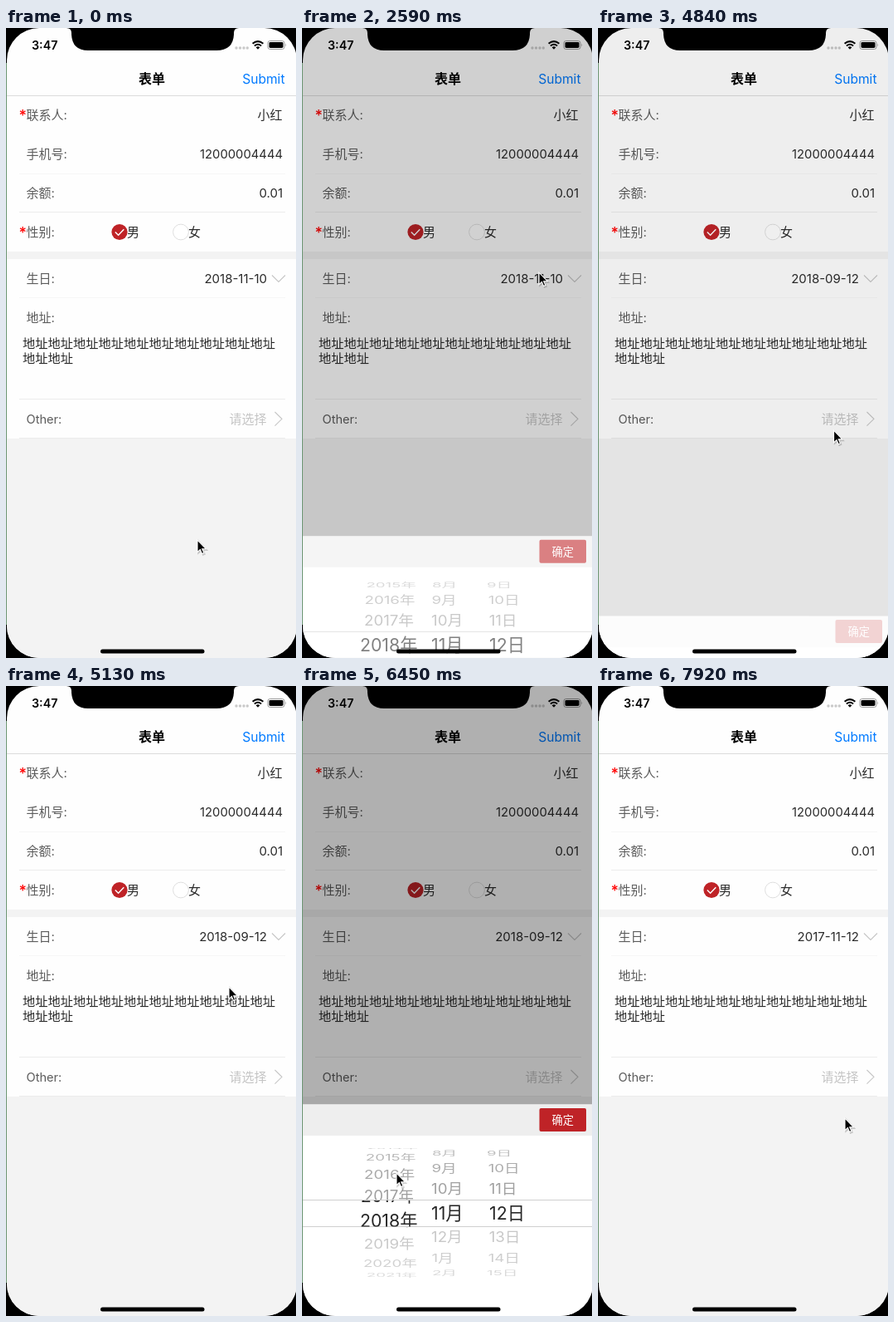
An HTML page that plays this animation: 350x758 px, repeating every 8000 ms.

```html
<!DOCTYPE html>
<html lang="zh-CN">
<head>
<meta charset="utf-8">
<title>表单</title>
<style>
  html, body { margin: 0; width: 100%; height: 100%; overflow: hidden; background: #000; }
  svg { display: block; width: 350px; height: 758px; }
  text { font: 400 15px Inter, 'Noto Sans CJK SC', 'Noto Sans CJK', 'Noto Sans CJK JP', sans-serif; fill: #2b2b2b; }
  .label { fill: #5c5c5c; }
  .hint { fill: #c4c4c4; }
  .star { font-size: 18px; font-weight: 500; fill: #f00; }
  .end { text-anchor: end; }
  .mid { text-anchor: middle; }
  .line { fill: none; stroke: #c6c6c6; stroke-width: 1.1; }
  #outer text { font-size: 18.7px; fill: #333; }
  #inner text { font-size: 21.3px; fill: #262626; }
</style>
</head>
<body>
<svg viewBox="0 0 350 758">
  <defs>
    <clipPath id="screen"><rect x="1" width="350" height="758" rx="39"/></clipPath>
    <clipPath id="band"><rect y="619" width="350" height="31.5"/></clipPath>
    <clipPath id="around"><path d="M0 556H350V618.5H0ZM0 651H350V712H0Z"/></clipPath>
  </defs>
  <rect width="350" height="758"/>
  <rect y="42" width="1" height="676" fill="#6d9673"/>
  <g clip-path="url(#screen)">
    <rect width="350" height="758" fill="#fefefe"/>
    <path d="M0 269H350V278H0ZM0 494H350V758H0Z" fill="#f3f3f3"/>
    <path d="M0 81.5H350" stroke="#dcdcdc"/>
    <path d="M16 221.5H337M16 446.5H337M16 493.5H337" stroke="#ececec"/>
    <path d="M16 175.5H337M16 324.5H337" stroke="#f6f6f6"/>

    <text x="31" y="26" style="font-size:14.3px;font-weight:600;fill:#000">3:47</text>
    <g fill="#c9c9c9">
      <circle cx="278" cy="24" r="1.7"/><circle cx="282.5" cy="24" r="1.7"/>
      <circle cx="287" cy="24" r="1.7"/><circle cx="291.3" cy="24" r="1.7"/>
    </g>
    <path d="M297.6 18.8Q304 13.4 310.4 18.8M299.9 21.4Q304 18 308.1 21.4" fill="none" stroke="#000" stroke-width="2"/>
    <path d="M301.6 23.2Q304 21.4 306.4 23.2L304 25.7Z"/>
    <rect x="316" y="15.5" width="20" height="10" rx="2.6" fill="none" stroke="#9a9a9a"/>
    <rect x="317.5" y="17" width="17" height="7" rx="1.4"/>
    <path d="M337.5 18.8Q339 20.5 337.5 22.2Z" fill="#9a9a9a"/>

    <text class="mid" x="176" y="67" style="font-size:16px;font-weight:600;fill:#000">表单</text>
    <text class="end" x="336.5" y="66.5" style="font-size:15.6px;fill:#007aff">Submit</text>

    <text class="star" x="15.5" y="111.5">*</text>
    <text class="label" x="24.5" y="110">联系人:</text>
    <text class="end" x="333.5" y="110">小红</text>
    <text class="label" x="24.5" y="157">手机号:</text>
    <text class="end" x="334" y="157" style="font-size:14.8px">12000004444</text>
    <text class="label" x="24.5" y="204">余额:</text>
    <text class="end" x="334" y="204">0.01</text>
    <text class="star" x="15.5" y="252.5">*</text>
    <text class="label" x="24.5" y="251">性别:</text>
    <circle cx="137" cy="245.5" r="9.6" fill="#bf2327"/>
    <path d="M131.8 245.6L135.6 249.3L142.3 242.2" fill="none" stroke="#fff" stroke-width="1.4"/>
    <text x="146" y="251">男</text>
    <circle cx="211" cy="245.5" r="9.4" fill="#fff" stroke="#dedede"/>
    <text x="220" y="251">女</text>
    <text class="label" x="24.5" y="307">生日:</text>
    <text class="end" id="date" x="315" y="307"></text>
    <path class="line" d="M321 297.5L329 305.5L337 297.5"/>
    <text class="label" x="24.5" y="354">地址:</text>
    <text x="20" y="385" style="font-size:15.25px">地址地址地址地址地址地址地址地址地址地址</text>
    <text x="20" y="402.5" style="font-size:15.25px">地址地址</text>
    <text class="label" x="24.5" y="476" style="font-size:14.6px">Other:</text>
    <text class="hint end" x="314.5" y="476">请选择</text>
    <path class="line" d="M324.5 462L333 470.3L324.5 478.6"/>

    <rect id="dim" width="350" height="758"/>
    <g id="sheet">
      <rect y="503.5" width="350" height="256" fill="#fff"/>
      <g id="content">
        <rect y="503.5" width="350" height="37.5" fill="#eee"/>
        <rect x="286.5" y="508" width="56.5" height="28" rx="2" fill="#bf2327"/>
        <text class="mid" x="314.7" y="526.8" style="font-size:13.2px;fill:#fff">确定</text>
        <g id="outer" clip-path="url(#around)"></g>
        <path d="M0 618.5H350M0 650.5H350" stroke="#cfcfcf"/>
        <g id="inner" clip-path="url(#band)"></g>
      </g>
    </g>
    <rect x="114" y="747.5" width="125.5" height="5" rx="2.5"/>
    <path d="M73 0Q79 0 79 6V8Q80 27 99 27H254Q274 27 275 8V6Q275 0 281 0Z"/>
  </g>
  <g id="cursor">
    <path d="M1 1V16L4.5 13L6.7 18L9 17L6.9 12.2H11.5Z" fill="#000" opacity=".18" stroke="#000" stroke-width="1.5"/>
    <path d="M0 0V14.6L3.4 11.5L5.6 16.6L7.9 15.6L5.7 10.7H10.3Z" stroke="#fff" stroke-width="1.1"/>
  </g>
</svg>
<script>
const LOOP = 8000, START = 490, TICK = 148.4;
const ROW = 21.4 * Math.PI / 180, RADIUS = 79.5, MIDDLE = 634;
const $ = id => document.getElementById(id);

const cursorKeys = [
  [-1, 231, 616], [5, 290, 458], [8, 290, 458], [11, 286, 294], [15, 286, 294],
  [19, 160, 588], [23, 154, 643], [24, 154, 646], [27, 290, 527], [28, 290, 527],
  [31, 269, 362], [33, 286, 294], [36, 286, 294], [39, 114, 576], [40, 114, 586],
  [42, 114, 606], [43, 114, 606], [46, 298, 520]
];
const sheetKeys = [
  [13, 0], [14, .577], [15, .92], [16, 1], [27, 1], [28, .75], [29, .2], [30, 0],
  [34, 0], [35, .577], [36, .92], [37, 1], [46, 1], [47, .9], [48, .5], [49, .12], [50, 0]
];
const monthKeys = [[19, 11], [23, 9.14], [25, 9], [33, 9], [34, 11]];
const yearKeys = [[39, 2018], [40, 2017.69], [42, 2017.04], [43, 2017]];

function at(keys, tick, ease = k => k) {
  const i = keys.findIndex(key => key[0] >= tick);
  if (i < 0) return keys[keys.length - 1].slice(1);
  if (i === 0) return keys[0].slice(1);
  const a = keys[i - 1], b = keys[i];
  const k = ease((tick - a[0]) / (b[0] - a[0]));
  return a.slice(1).map((v, n) => v + (b[n + 1] - v) * k);
}

const smooth = k => k * k * (3 - 2 * k);

function wheel(pos, x, bend, anchor, name) {
  let outer = '', inner = '';
  for (let i = Math.ceil(pos - 4); i <= pos + 4; i++) {
    const d = i - pos, angle = d * ROW;
    if (Math.abs(angle) > 1.5) continue;
    const y = MIDDLE + RADIUS * Math.sin(angle);
    const squash = Math.cos(angle);
    const alpha = (d > 0 ? .28 : .48) * (.4 + .6 * squash);
    const item = (size, extra) =>
      `<text transform="translate(${x + bend * d * d} ${y}) scale(1 ${squash})" y="${size * .36}" ` +
      `text-anchor="${anchor}" ${extra}>${name(i)}</text>`;
    outer += item(18.7, `opacity="${alpha}"`);
    if (Math.abs(d) < 1.2) inner += item(21.3, '');
  }
  return [outer, inner];
}

function draw(tick) {
  const [x, y] = at(cursorKeys, tick, smooth);
  const [open] = at(sheetKeys, tick);
  const [month] = at(monthKeys, tick);
  const [year] = at(yearKeys, tick);

  $('cursor').setAttribute('transform', `translate(${x} ${y})`);
  $('date').textContent = tick < 28 ? '2018-11-10' : tick < 47 ? '2018-09-12' : '2017-11-12';
  $('dim').setAttribute('opacity', .31 * open);
  $('sheet').setAttribute('transform', `translate(0 ${255 * (1 - open)})`);
  $('sheet').setAttribute('visibility', open ? 'visible' : 'hidden');
  $('content').setAttribute('opacity', open);

  const wheels = [
    wheel(year, 104.7, .33, 'middle', i => i + '年'),
    wheel(month, 156, .1, 'start', i => (i + 11) % 12 + 1 + '月'),
    wheel(12, 226, -.33, 'start', i => i + '日')
  ];
  $('outer').innerHTML = wheels.map(w => w[0]).join('');
  $('inner').innerHTML = wheels.map(w => w[1]).join('');
}

let shown = null;
function frame() {
  const tick = Math.max(-1, Math.floor((performance.now() % LOOP - START) / TICK));
  if (tick !== shown) draw(shown = tick);
  requestAnimationFrame(frame);
}
frame();
</script>
</body>
</html>
```
